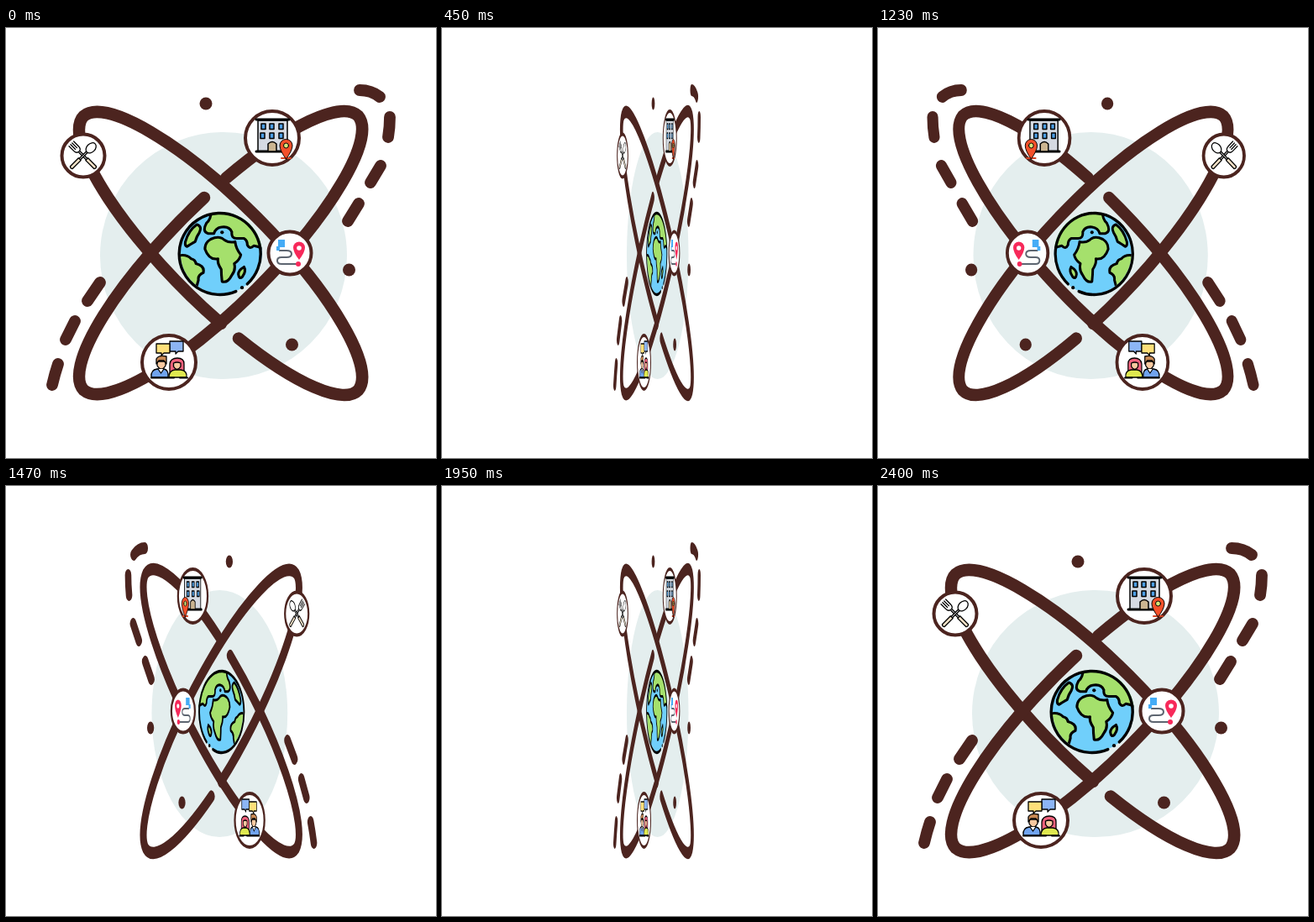
Recreate the animation shown at these times as an HTML page. Size 512 by 512 pixels, loop 2430 ms.

```html
<!DOCTYPE html>
<html lang="en">
<head>
<meta charset="utf-8">
<title>Spinning orbits</title>
<style>
  html, body { margin: 0; width: 100%; height: 100%; overflow: hidden; background: #fff; }
  svg { display: block; width: 100%; height: 100%; }
  .line { fill: none; stroke: #4c241f; stroke-linecap: round; stroke-linejoin: round; }
  .badge { fill: #fff; stroke: #4c241f; stroke-width: 4; }
  .ink { stroke: #000; stroke-linecap: round; stroke-linejoin: round; }
</style>
</head>
<body>
<svg viewBox="0 0 512 512">
  <defs>
    <clipPath id="sphere"><circle cx="256" cy="268" r="50"/></clipPath>
    <path id="window" d="M0 0h5v6.500h-5z" fill="#4d9fe6" class="ink" stroke-width="1.500"/>
  </defs>
  <g id="atom">
    <circle cx="259" cy="271" r="147" fill="#e4eeee"/>

    <!-- orbits: tilted ellipses drawn from tip to tip -->
    <g class="line" stroke-width="14.500">
      <path d="M277 369.600A231 61.500 45 0 0 419.300 431.300A231 61.500 45 0 0 92.700 104.700A231 61.500 45 0 0 256 352"/>
      <path d="M236 202A231 61.500 -45 0 0 92.700 431.300A231 61.500 -45 0 0 419.300 104.700A231 61.500 -45 0 0 262 178.800"/>
    </g>
    <path class="line" stroke-width="13.800" d="M421 74Q435 74 445 82M457 106Q457 118 455 130M446 164L434 184M420 209L407 230M112 303L97 325M82 349L71 371M62 400Q58 412 55 425"/>
    <g fill="#4c241f">
      <circle cx="238" cy="90" r="7.500"/>
      <circle cx="408.500" cy="288" r="7.500"/>
      <circle cx="340.500" cy="377" r="7.500"/>
    </g>

    <!-- globe -->
    <g transform="translate(256.300 268) scale(.97) translate(-256 -268)">
      <circle cx="256" cy="268" r="50" fill="#70cffb"/>
      <g clip-path="url(#sphere)" fill="#a5e06c" class="ink" stroke-width="3.200">
        <path d="M243 212Q245 225 238 231Q232 242 240 244H247Q249 237 257 236Q266 235 269 242Q268 250 275 250H284Q288 252 288 258Q291 264 296 259Q302 260 310 264V212Z"/>
        <path d="M236 263Q236 255 243 251Q254 246 260 252Q266 256 273 254Q274 263 280 270Q279 276 272 281Q274 289 269 295Q264 305 257 303Q256 294 256 288Q251 281 252 275Q241 277 236 263Z"/>
        <path d="M212 254Q216 240 226 233Q233 235 229 243Q226 247 224 254Q217 258 214 260Q211 259 212 254Z"/>
        <path d="M200 272Q213 268 219 275Q224 276 225 281Q236 284 234 292Q227 295 228 301L225 312L196 300Z"/>
        <path d="M284 285Q287 290 282 297Q278 301 277 294Q277 289 284 285Z"/>
      </g>
      <path d="M274 315A50 50 0 1 1 288 306" fill="none" class="ink" stroke-width="3.500"/>
      <circle cx="281.500" cy="310.500" r="2.200"/>
      <circle cx="257" cy="242.500" r="2.200"/>
    </g>

    <!-- fork and spoon -->
    <circle class="badge" cx="92" cy="152" r="25.500"/>
    <g fill="#fff" class="ink" stroke-width="1.300">
      <g transform="translate(92 152) rotate(-45)">
        <path d="M-1 -6V6H1V-6M-4 -20V-12Q-4 -7 0 -7Q4 -7 4 -12V-20M-1.300 -20V-12M1.300 -20V-12"/>
        <path d="M-2 6H2V20Q0 22 -2 20Z" fill="#f0dfc5"/>
      </g>
      <g transform="translate(92 152) rotate(45)">
        <path d="M-1 -6V6H1V-6Z"/>
        <ellipse cy="-13" rx="5" ry="7"/>
        <path d="M-2 6H2V20Q0 22 -2 20Z" fill="#f0dfc5"/>
      </g>
    </g>

    <!-- building -->
    <circle class="badge" cx="317" cy="131" r="32"/>
    <g class="ink" stroke-width="1.500">
      <path d="M300 110H335V147H300Z" fill="#d5dae2"/>
      <path d="M298 109H337M298 147H328" stroke-width="3"/>
      <use href="#window" x="304" y="114"/><use href="#window" x="314" y="114"/><use href="#window" x="325" y="114"/>
      <use href="#window" x="303" y="125"/><use href="#window" x="314" y="125"/><use href="#window" x="325" y="125"/>
      <path d="M312 147V138Q317 133 322 138V147Z" fill="#cbb591"/>
      <path d="M328 155H339" stroke="#d34323" stroke-width="2"/>
      <path d="M333.500 156Q326 146 326 140A7.500 7.500 0 0 1 341 140Q341 146 333.500 156Z" fill="#f4502a" stroke-width="1"/>
      <circle cx="333.500" cy="140" r="3" fill="#d5e67a" stroke-width="1"/>
    </g>

    <!-- route -->
    <circle class="badge" cx="338" cy="268" r="25.500"/>
    <path d="M325 265H334Q340 265 340 269T334 273H328Q323 273 323 277T328 281H347" fill="none" stroke="#5d6570" stroke-width="2"/>
    <path d="M324 252H332V261H326V265H322V260H324Z" fill="#45acf6"/>
    <path d="M349 276Q342 267 342 261.500A7 7 0 0 1 356 261.500Q356 267 349 276Z" fill="#f7295a"/>
    <circle cx="349" cy="262" r="2.800" fill="#fff"/>
    <circle cx="348" cy="281" r="3" fill="#f7295a"/>

    <!-- people -->
    <circle class="badge" cx="194" cy="398" r="32"/>
    <g class="ink" stroke-width="1.300">
      <path d="M195 373H211V385H205L202 388V385H195Z" fill="#8cb5f5"/>
      <path d="M179 376H195V387H188L185 390V387H179Z" fill="#ffe07a"/>
      <path d="M173 416Q172 407 180 406H188Q194 407 193 416Z" fill="#70a4ef"/>
      <path d="M195 411V400Q196 393 204 393Q212 393 212 400V411Z" fill="#ef627d"/>
      <path d="M194 416Q194 408 201 407H208Q216 408 215 416Z" fill="#dfe94f"/>
      <path d="M180 397V402Q185 410 190 402V397Z" fill="#f8c9a0"/>
      <path d="M199.500 399V403Q203.500 410 208 403V399Q203.500 397 199.500 399Z" fill="#f8c9a0"/>
      <path d="M179 400V394Q182 389 191 391V400L188 396H182Z" fill="#c98a55"/>
      <path d="M181 406L184.500 411L188 406" fill="#fff"/>
      <path d="M173 416.500H200M207 416.500H216" stroke-width="2"/>
    </g>
  </g>
</svg>
<script>
  const LOOP = 2430, STEP = 30, HALF_TURN = 1200;
  const atom = document.getElementById('atom');

  // Width goes linearly from 1 to -1 and back, in 30 ms steps.
  function draw() {
    const time = Math.floor(performance.now() % LOOP / STEP) * STEP;
    const width = Math.abs(time - HALF_TURN) * 2 / HALF_TURN - 1;
    atom.setAttribute('transform', `matrix(${width} 0 0 1 ${256 * (1 - width)} 0)`);
    requestAnimationFrame(draw);
  }
  draw();
</script>
</body>
</html>
```
